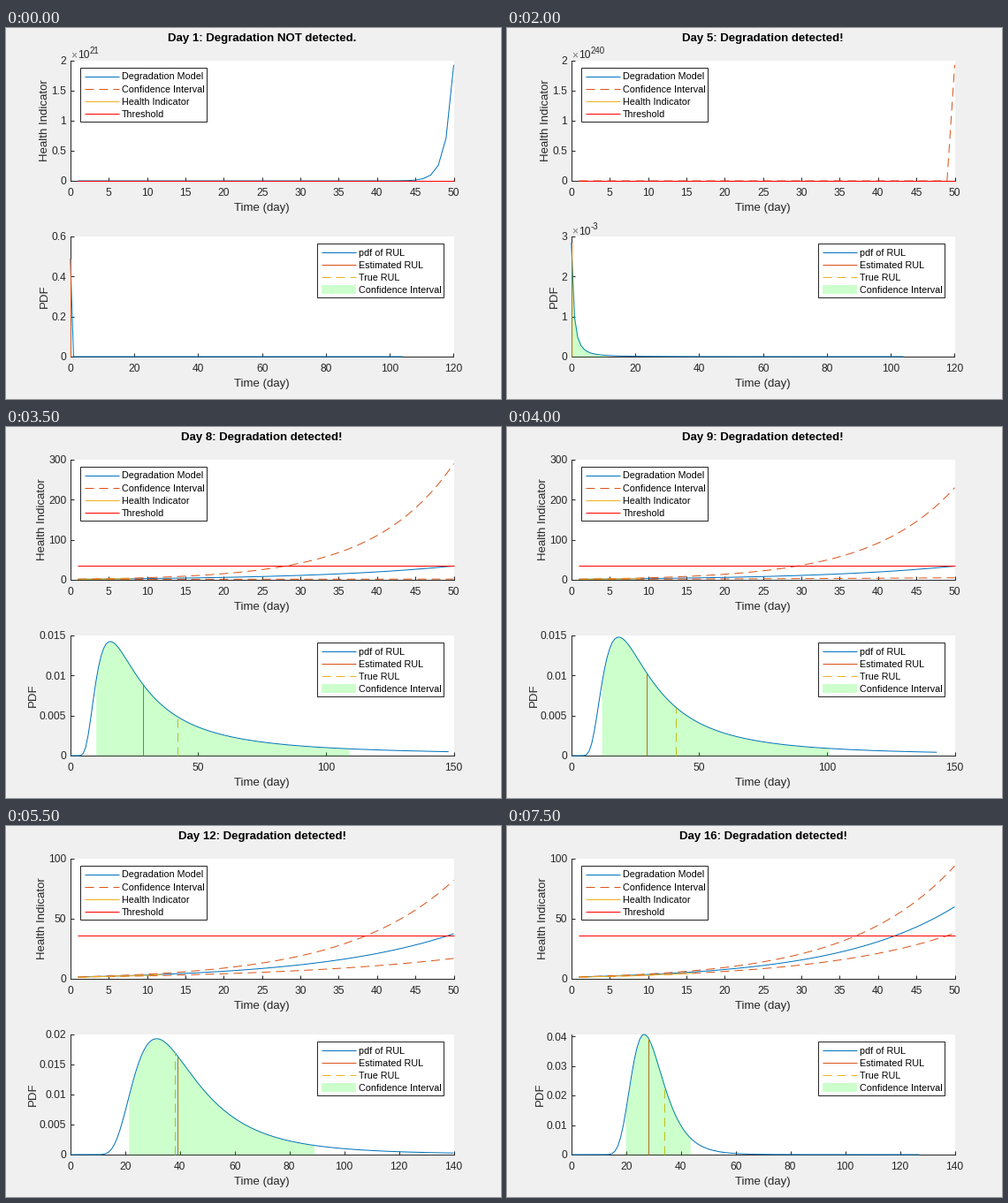
These frames come from a looping animation (560x420 px, 8 s). A matplotlib script:

```python
import numpy as np
import matplotlib.pyplot as plt
from matplotlib.animation import FuncAnimation
from matplotlib.patches import Rectangle

W, H, DPI = 560, 420, 100
PX = 72 / DPI
LEFT, RIGHT, HEIGHT = 72.8, 506.5, 136
MID = (LEFT + RIGHT) / 2
DAYS, THRESHOLD, DETECTED = 50, 35.7, 5

INK, BLUE, ORANGE, YELLOW, RED = "#262626", "#0072bd", "#d95319", "#edb120", "#ff0000"
BAND = dict(color="#00ff00", alpha=0.2, lw=0)

plt.rcParams["font.family"] = "Liberation Sans"

# Key values after detection; days between are interpolated
KEY_DAYS = [6, 8, 9, 10, 12, 14, 16]
KEYS = dict(
    model=[33, 34.7, 34.3, 34, 37.5, 50, 60],
    upper=[760, 290, 230, 109, 82, 88, 94],
    lower=[0.8, 2, 5, 10, 17, 28, 38],
    mode=[7, 15.6, 18.5, 22.4, 31.5, 27.5, 26.6],
    peak=[0.0048, 0.01425, 0.0148, 0.0202, 0.0193, 0.0331, 0.0408],
    width=[1, 0.57, 0.48, 0.344, 0.262, 0.13, 0.096],
    end=[118, 148, 143, 134, 141, 131, 127])


def key(name, day):
    return np.interp(day, KEY_DAYS, KEYS[name])


def add_axes(x0, y0, x1, y1):
    return fig.add_axes([x0 / W, 1 - y1 / H, (x1 - x0) / W, (y1 - y0) / H])


fig = plt.figure(figsize=(W / DPI, H / DPI), dpi=DPI, facecolor="#f0f0f0")
health_ax = add_axes(LEFT, 37, RIGHT, 37 + HEIGHT)
pdf_ax = add_axes(LEFT, 236, RIGHT, 236 + HEIGHT)
page = add_axes(0, 0, W, H)


def text(x, y, s, size, ha="left", **kw):
    page.text(x, y, s, fontsize=size * PX, ha=ha, va="baseline", **{"color": INK, **kw})


def line(ax, x, y, color, dashed=False, z=3):
    ax.plot(x, y, color=color, lw=PX, ls=(0, (10, 6)) if dashed else "-",
            solid_capstyle="butt", dash_capstyle="butt", clip_on=False, zorder=z)


def ticks(limit, step):
    return np.arange(0, limit + step * 1e-6, step)


def nice_axis(peak):
    """Limit and tick step; the limit stays tight just above a tick."""
    steps = (m * 10.0 ** k for k in range(-4, 4) for m in (1, 2, 5))
    step = next(s for s in steps if peak / s <= 4.09)
    n = peak / step
    return (peak if n % 1 < 0.2 else np.ceil(n) * step), step


def draw_axes(ax, top, xlim, xstep, peak, power, ylabel):
    bottom = top + HEIGHT
    ylim, ystep = nice_axis(peak)
    ax.clear()
    ax.set(xlim=(0, xlim), ylim=(0, ylim), xticks=ticks(xlim, xstep),
           yticks=ticks(ylim, ystep), facecolor="white")
    ax.tick_params(direction="in", length=4 * PX, width=PX, color=INK,
                   labelbottom=False, labelleft=False)
    ax.spines[["top", "right"]].set_visible(False)
    for side in ("left", "bottom"):
        ax.spines[side].set(color=INK, linewidth=PX)

    for v in ticks(xlim, xstep):
        text(LEFT + (RIGHT - LEFT) * v / xlim, bottom + 17, f"{v:g}", 12, "center")
    labels = [f"{round(v, 6):g}" for v in ticks(ylim, ystep)]
    for i, s in enumerate(labels):
        text(68.3, bottom - HEIGHT * i * ystep / ylim + 4.3, s, 12, "right")
    wide = max(12 * sum(0.278 if c == "." else 0.556 for c in s) for s in labels)
    text(64 - wide, top + 68, ylabel, 13.3, "center", rotation=90, rotation_mode="anchor")
    text(MID, bottom + 34, "Time (day)", 13.3, "center")
    if power:
        text(73, top - 2.5, "×", 12, color="#777777")
        text(81, top - 2.5, "10", 12)
        text(94.5, top - 8, str(power), 9.6)


def legend(x, y, rows):
    page.add_patch(Rectangle((x, y), 143, 61, fc="white", ec=INK, lw=PX, zorder=2))
    for i, (label, color, kind) in enumerate(rows):
        mid = y + 9.5 + 14.3 * i
        if kind == "patch":
            page.add_patch(Rectangle((x + 5, mid - 5), 39, 10, zorder=3, **BAND))
        else:
            line(page, [x + 5, x + 44], [mid, mid], color, kind == "dash")
        text(x + 46.7, mid + 4, label, 10.8, color="black", zorder=4)


def draw_health(day):
    t = np.arange(1, DAYS + 1)
    early = day <= DETECTED
    if early:
        # The fit still explodes: one curve shoots up at the last day
        peak, power = 1.93, int(21 + 54.75 * (day - 1))
        shoot = peak * np.exp((1 if day == 1 else 500) * (t - DAYS))
        curves = [(shoot, BLUE if day == 1 else ORANGE, day > 1)]
    else:
        peak, power = key("upper", day), 0
        curves = []
        for name, scale in (("model", 2.4), ("upper", 2.4), ("lower", 2.3)):
            y = scale * ((key(name, day) + 1) / scale) ** (t / DAYS) - 1
            curves.append((y, BLUE if name == "model" else ORANGE, name != "model"))
    draw_axes(health_ax, 37, DAYS, 5, peak, power, "Health Indicator")
    for y, color, dashed in curves:
        line(health_ax, t, y, color, dashed)
    if not early:
        seen = t[:day]
        wobble = 0.25 * np.sin(2.3 * seen)
        line(health_ax, seen, 2.2 * np.exp(0.06 * seen) - 1 + wobble, YELLOW, z=4)
    level = 0 if early else THRESHOLD
    line(health_ax, [1, DAYS], [level, level], RED, z=5)


def density(day):
    if day <= DETECTED:
        x = np.arange(0, 105.0)
        scale = 1.6 * ((day - 1) / 4) ** 2 + 0.001
        return x, 0.49 * 0.276 ** (day - 1) / (1 + x / scale) ** 2.2
    x = np.arange(0, key("end", day) + 0.01)
    u = np.log(np.maximum(x, 1e-3) / key("mode", day))
    return x, key("peak", day) * np.exp(-u * u / (key("width", day) * (1 + 0.5 * u + 0.1 * u * u)))


def draw_pdf(day):
    x, f = density(day)
    power = -3 if f.max() < 0.008 else 0
    f = f / 10.0 ** power
    step = 50 if x[-1] > 140 and day < 12 else 20
    span = min(np.ceil(x[-1] / step) * step, 150 if step == 50 else 140)
    draw_axes(pdf_ax, 236, span, step, f.max(), power, "PDF")

    low, est, high = np.interp([0.05, 0.5, 0.95], np.cumsum(f) / f.sum(), x)
    shown = x <= span
    line(pdf_ax, x[shown], f[shown], BLUE)
    for at, color, dashed in ((est, ORANGE, False), (DAYS - day, YELLOW, True)):
        line(pdf_ax, [at, at], [0, np.interp(at, x, f)], color, dashed, 4)
    band = np.linspace(low, high, 300)
    pdf_ax.fill_between(band, np.interp(band, x, f), zorder=6, **BAND)


def draw(i):
    day = i + 1
    page.clear()
    page.set(xlim=(0, W), ylim=(H, 0))
    page.axis("off")
    state = "detected!" if day >= DETECTED else "NOT detected."
    text(MID, 15.5, f"Day {day}: Degradation {state}", 13.3, "center",
         color="black", weight="bold")
    draw_health(day)
    draw_pdf(day)
    legend(84, 45, [("Degradation Model", BLUE, "line"),
                    ("Confidence Interval", ORANGE, "dash"),
                    ("Health Indicator", YELLOW, "line"),
                    ("Threshold", RED, "line")])
    legend(352, 244, [("pdf of RUL", BLUE, "line"),
                      ("Estimated RUL", ORANGE, "line"),
                      ("True RUL", YELLOW, "dash"),
                      ("Confidence Interval", None, "patch")])
    return []


anim = FuncAnimation(fig, draw, frames=16, interval=500, repeat=True, repeat_delay=0)
plt.show()
```
